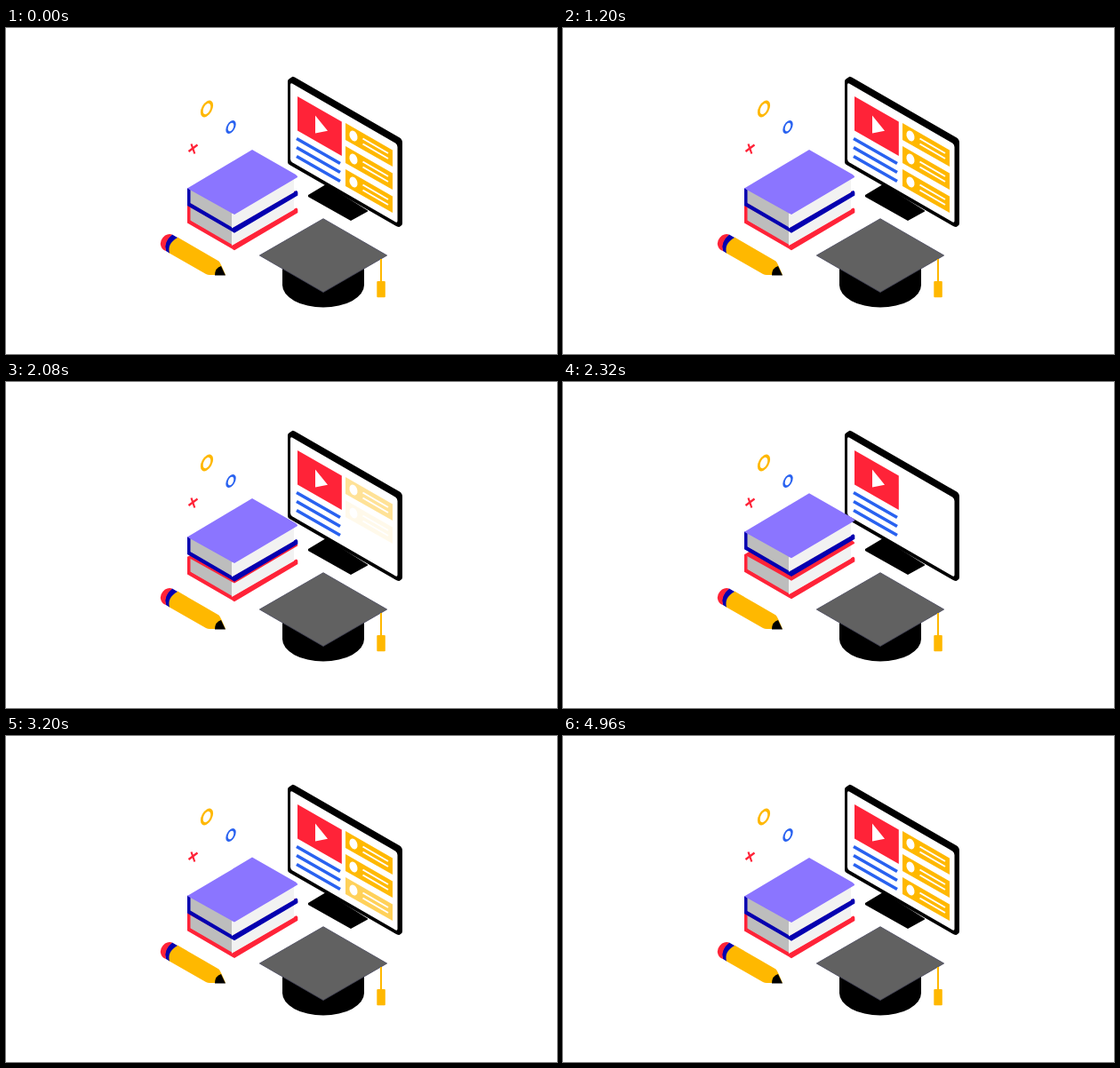
An HTML page for the animation above (5 s loop, 620 by 367 pixels).

```html
<!DOCTYPE html>
<html lang="en">
<head>
<meta charset="utf-8">
<title>Online learning</title>
<style>
  html, body { margin: 0; width: 100%; height: 100%; overflow: hidden; background: #fff; }
  svg { display: block; width: 620px; height: 367px; }
</style>
</head>
<body>
<svg viewBox="0 0 620 367" fill="none">
  <defs>
    <g id="book">
      <path fill="currentColor" d="M204 180L208 182V197L256 224L324 184.5L326.5 183Q328.3 183.5 328.3 185V188.5L257 230.7L204 200Z"/>
      <path fill="#bdbdbd" d="M207.5 180L255 208V224.8L207.5 197Z"/>
      <path fill="#f2f2f2" d="M254 209L324 168V185L254 225.5Z"/>
    </g>
    <path id="cover" d="M204 180.5L277 137L326 165L328 167V168L257 210Z"/>
    <g id="card">
      <path fill="#ffb800" d="M382 107L435 137.5V156L382 126Z"/>
      <ellipse fill="#fff" cx="391" cy="121.5" rx="4.2" ry="6.3" transform="rotate(-22 391 121.5)"/>
      <path stroke="#fff" stroke-width="2" d="M401.5 124.5L430 141M401.5 130.5L430 147"/>
    </g>
  </defs>

  <!-- monitor -->
  <path fill="#000" d="M340 188L360 176L407 205.5V206.5L388 217L340 190Z"/>
  <path fill="#000" d="M317 60Q317 58 319 57L322 55Q323 54.5 325 55.5L443 123.5Q446 125.5 446 129V220Q446 222 444 223L442.5 224Q441 224 439 223L319 154Q317 153 317 151Z"/>
  <path fill="#fff" d="M320 64Q320 61.5 322 62.5L438 129.5Q440.5 131 440.5 134V217Q440.5 219.5 438.5 218.5L322.5 151.5Q320 150 320 147.5Z"/>
  <path fill="#ff2338" d="M328 77L377.8 105.5V144L328 115.5Z"/>
  <path fill="#fff" d="M348 98.5L362 115.7L348 118.5Z"/>
  <path stroke="#2962f0" stroke-width="3.6" d="M327 124.5L376 152.5M327 134.5L376 162.5M327 144.5L376 172.5"/>
  <g id="cards">
    <use href="#card"/>
    <use href="#card" y="26"/>
    <use href="#card" y="52"/>
  </g>

  <!-- books -->
  <g id="lower">
    <g transform="translate(0 19.5)" color="#ff2338">
      <use href="#book"/>
      <use href="#cover" fill="currentColor"/>
    </g>
  </g>
  <g id="upper" color="#0500b0">
    <use href="#book"/>
    <use href="#cover" fill="#8b75ff"/>
  </g>

  <!-- small shapes -->
  <g transform="translate(226 91) skewY(-30)"><ellipse rx="5.7" ry="7" stroke="#ffb800" stroke-width="2.8"/></g>
  <g transform="translate(253 111.5) skewY(-30)"><ellipse rx="4.5" ry="5.6" stroke="#2962f0" stroke-width="2.4"/></g>
  <path stroke="#ff2338" stroke-width="2.2" d="M205.5 139L215.5 131.5M208.5 130.5L212.3 141.5"/>

  <!-- pencil -->
  <path fill="#ffb800" d="M193 235.5L239.5 262.5Q241.5 264.5 247 278H229Q227 278 225 277L183 253Q180 243 193 235.5Z"/>
  <path fill="#000" d="M242 268L247 278.5H235Q235 270 242 268Z"/>
  <path fill="#0500b0" d="M187 232.5L193 236Q181 243 184 253.5L180 251Q176 241 187 232.5Z"/>
  <path fill="#ff2338" d="M187 232.5Q183 231 179 233.5Q172 239 174.5 246Q176 250 180 251Q177 241 187 232.5Z"/>

  <!-- cap -->
  <path fill="#000" d="M311 265H403V289.5A46 25 0 0 1 311 289.5Z"/>
  <path fill="#616161" stroke="#45455a" stroke-width=".8" d="M285.3 256L357 214.7L428.7 256L357 297.5Z"/>
  <path stroke="#ffb800" stroke-width="2" d="M422 260V287"/>
  <rect fill="#ffb800" x="417.3" y="285" width="9.5" height="18.2" rx="1"/>
</svg>
<script>
  const LOOP = 5000;
  const [cards, lower, upper] = ['cards', 'lower', 'upper'].map(id => document.getElementById(id));
  const clamp = x => Math.min(1, Math.max(0, x));
  const smooth = x => x * x * (3 - 2 * x);

  function draw(now) {
    // Books and cards each mirror their motion around a moment near mid-loop.
    const away = middle => Math.abs(now % LOOP - middle);
    const lift = 13.5 * smooth(clamp(1 - away(2500) / 780));
    upper.setAttribute('transform', `translate(0 ${-lift})`);
    lower.setAttribute('transform', `translate(0 ${-lift / 2})`);
    [...cards.children].forEach((card, i) => {
      card.setAttribute('opacity', clamp((away(2450) - 195 - 140 * i) / 430));
    });
    requestAnimationFrame(draw);
  }
  draw(performance.now());
</script>
</body>
</html>
```
